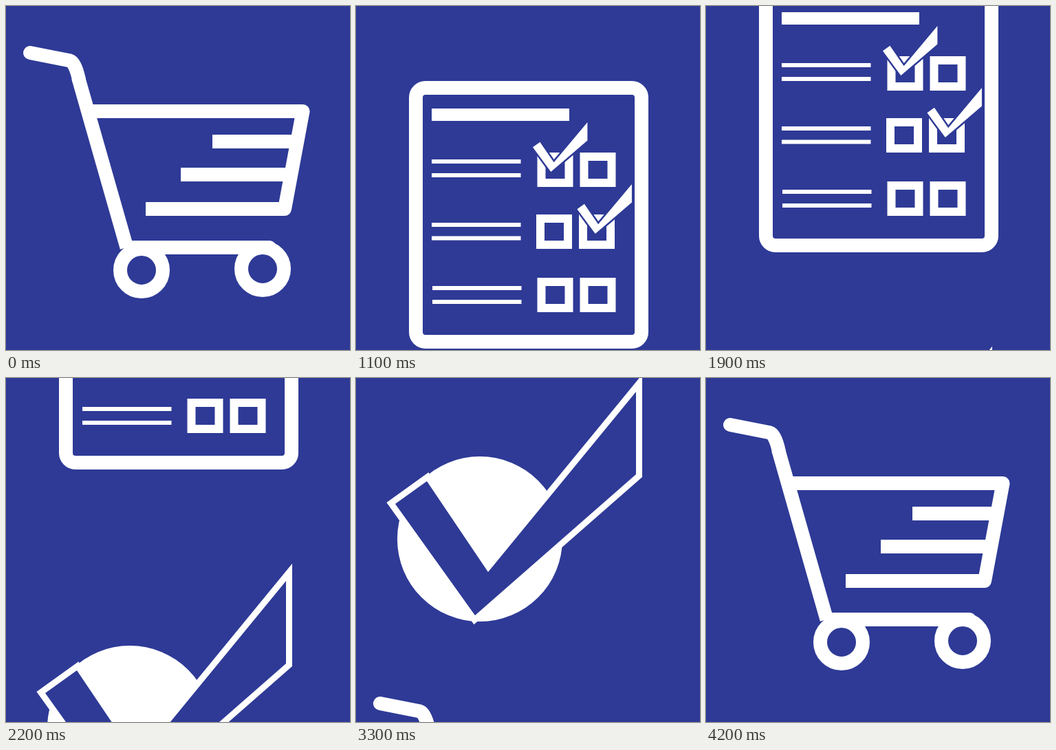
Recreate the animation shown at these times as an HTML page. Size 500 by 500 pixels, loop 4.3 s.

```html
<!DOCTYPE html>
<html lang="en">
<head>
<meta charset="utf-8">
<title>Shopping steps</title>
<style>
  html, body { margin: 0; height: 100%; overflow: hidden; background: #2e3a96; }
  svg { display: block; width: 100%; height: 100%; }
  .line { fill: none; stroke: #fff; stroke-width: 20; }
  .white { fill: #fff; }
  .boxes { fill: none; stroke: #fff; stroke-width: 12; }
  .tick { paint-order: stroke; stroke-miterlimit: 4; }
  .big { fill: #2e3a96; stroke: #fff; stroke-width: 18; }
  .small { fill: #fff; stroke: #2e3a96; stroke-width: 22; }
</style>
</head>
<body>
<svg viewBox="0 0 500 500">
  <defs>
    <path id="tick" d="M57 298L103 265L192 397L407 135V255L173 460Z"/>
  </defs>
  <g id="strip">
    <g id="cart" class="line">
      <path stroke-linecap="round" d="M35 68L93 79.5C98 81 103 92 106 107"/>
      <path d="M105 104L175.500 351M300 197H420M254 245H410"/>
      <path stroke-linejoin="round" d="M124 153H431.500L405 295H203"/>
      <path stroke-linecap="round" d="M184 351H383"/>
      <circle cx="197" cy="384" r="31"/>
      <circle cx="373" cy="382" r="31"/>
    </g>

    <g id="list" transform="translate(0 455)">
      <rect class="line" x="87" y="119" width="328" height="369" rx="14"/>
      <path class="white" d="M110 149h200v18h-200z"/>
      <path class="line" style="stroke-width:6" d="M110 226h129.500m-129.500 20h129.500M110 318h129.500m-129.500 19.500h129.500M111 410h129.500m-129.500 20h129.500"/>
      <g class="boxes">
        <path d="M269.500 219h40v38h-40zm62 0h40v38h-40z"/>
        <path d="M268 309h40v38h-40zm62 0h40v38h-40z"/>
        <path d="M269.500 401h40v38h-40zm62 0h40v38h-40z"/>
      </g>
      <use href="#tick" class="tick small" transform="translate(244 139) scale(.227 .222)"/>
      <use href="#tick" class="tick small" transform="translate(308.500 229) scale(.227 .222)"/>
    </g>

    <g id="done" transform="translate(0 980)">
      <circle class="white" cx="180" cy="349" r="120"/>
      <use href="#tick" class="tick big"/>
    </g>

    <use href="#cart" y="1500"/>
  </g>
</svg>
<script>
  const LOOP = 4300, HOLD = 500, CYCLE = 1400, STEP = 100, STEPS = 10, PAGE = 500;
  const strip = document.getElementById('strip');

  // Each page holds, then scrolls up in ten quadratic ease-out steps.
  function scrollAt(time) {
    if (time < HOLD) return 0;
    const page = Math.floor((time - HOLD) / CYCLE);
    const local = (time - HOLD) % CYCLE;
    const step = Math.min(STEPS, Math.floor(local / STEP) + 1);
    return PAGE * (page + 1 - (1 - step / STEPS) ** 2);
  }

  function draw() {
    const y = scrollAt(performance.now() % LOOP);
    strip.setAttribute('transform', `translate(0 ${-y})`);
    requestAnimationFrame(draw);
  }
  draw();
</script>
</body>
</html>
```
